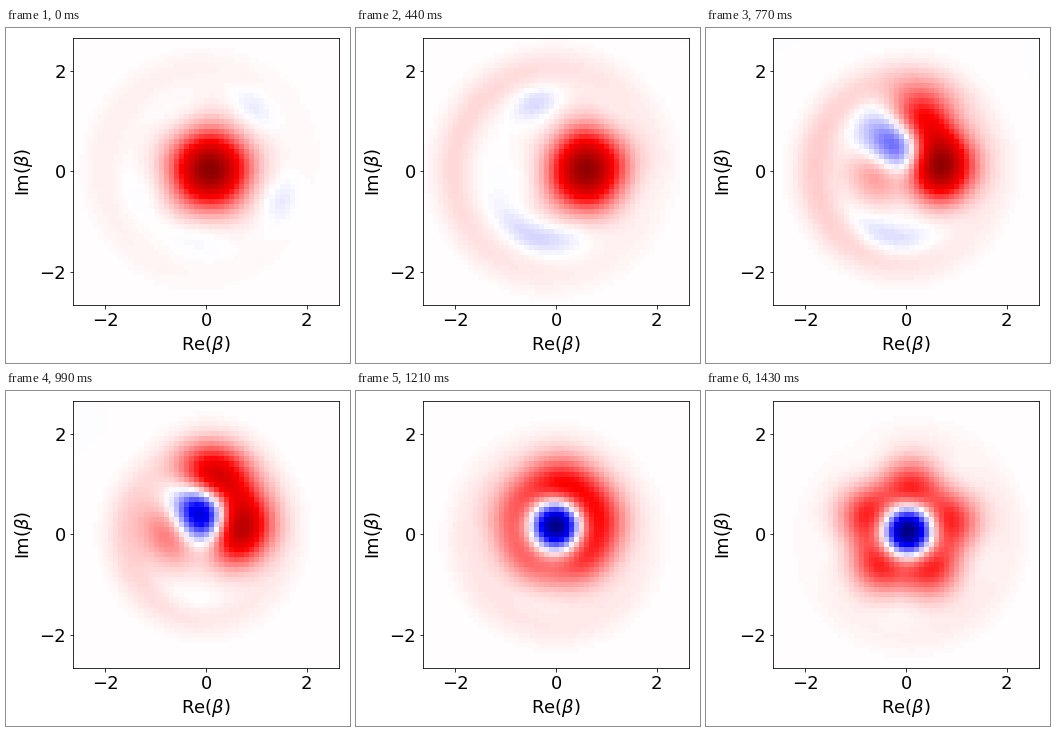
Animation, 344 px wide and 335 px high, one loop 2090 ms. Source, as a matplotlib script:

```python
import numpy as np
import matplotlib.pyplot as plt
from matplotlib.animation import FuncAnimation

W, H, DPI = 344, 335, 72
STEP_MS, SLOTS, LAST = 110, 19, 13
HALF, CELLS = 2.643, 53

edges = np.linspace(-HALF, HALF, CELLS + 1)
mid = (edges[:-1] + edges[1:]) / 2
X, Y = np.meshgrid(mid, mid)
Z = X + 1j * Y


def bump(s, peak, width):
    return np.exp(-((s - peak) / width) ** 2)


def ease(s, start, end):
    u = np.clip((s - start) / (end - start), 0, 1)
    return np.sin(np.pi / 2 * u) ** 2


def unit(degrees):
    return np.exp(1j * np.radians(degrees))


def fold(z, n, angle):
    """n-fold interference pattern with a positive lobe at the given angle."""
    return np.real((z * unit(-angle)) ** n) * np.exp(-2 * np.abs(z) ** 2)


def core(s):
    """Superposition of 0 and 1 photon, drifting right, then up and back."""
    z = Z - (0.03 + 0.36 * bump(s, 4.5, 2.8) * (1 - s / LAST) / 0.65
             + 1j * (0.04 + 0.42 * bump(s, 8.3, 2.8)))
    p = ease(s, 2.8, 12)
    r2 = np.abs(z) ** 2
    field = (1 - 2 * p + 4 * p * r2) * np.exp(-2 * r2)
    field += 4 * np.sqrt(p * (1 - p)) * fold(z, 1, 60 * ease(s, 6, LAST) - 10)
    field += 1.5 * bump(s, 8, 2) * fold(z, 3, -33)
    field += 0.5 * (bump(s, 2, 1.5) + bump(s, LAST, 1.5)) * fold(z, 5, 14)
    return (0.95 - 0.08 * s / LAST) * field


def ring(s):
    """Faint outer ring whose brighter side swings from left to lower right."""
    radius = 2.05 - 0.45 * bump(s, 9, 2.5)
    side = np.real(Z * unit(-155 - 170 * (s / LAST) ** 4)) / (np.abs(Z) + 1e-9)
    glow = 0.025 + 0.075 * bump(s, 6.5, 4)
    return glow * (1 + 0.6 * side) / 1.6 * bump(np.abs(Z), radius, 0.4)


def patch(radius, angle, spread):
    """Negative spot, stretched along a circle around the origin."""
    turn = np.degrees(np.angle(Z * unit(-angle)))
    return -bump(np.abs(Z), radius, 0.27) * bump(turn, 0, spread)


def wigner(s):
    field = core(s) + ring(s)
    field += 0.12 * bump(s, 2.8, 1.8) * patch(1.42, 207 - 25 * s, 18)
    field += 0.10 * bump(s, 5, 4) * patch(1.35, -108, 35)
    for angle in (-22, 54):
        field += 0.06 * bump(s, 0.8, 1.5) * patch(1.58, angle, 15)
    return field


plt.rcParams.update({"font.family": "DejaVu Sans", "font.size": 18})
fig = plt.figure(figsize=(W / DPI, H / DPI), dpi=DPI, facecolor="white")
ax = fig.add_axes([67 / W, 58.47 / H, 266.1 / W, 266.1 / H])
image = ax.imshow(wigner(0), cmap="seismic", vmin=-1, vmax=1, origin="lower",
                  extent=(-HALF, HALF, -HALF, HALF), interpolation="nearest",
                  aspect="auto")
ax.set_xticks([-2, 0, 2])
ax.set_yticks([-2, 0, 2])
ax.set_xlabel(r"Re($\beta$)")
ax.set_ylabel(r"Im($\beta$)")


def draw(slot):
    image.set_data(wigner(min(slot, LAST)))
    return [image]


anim = FuncAnimation(fig, draw, frames=SLOTS, interval=STEP_MS,
                     repeat=True, repeat_delay=0)
plt.show()
```
